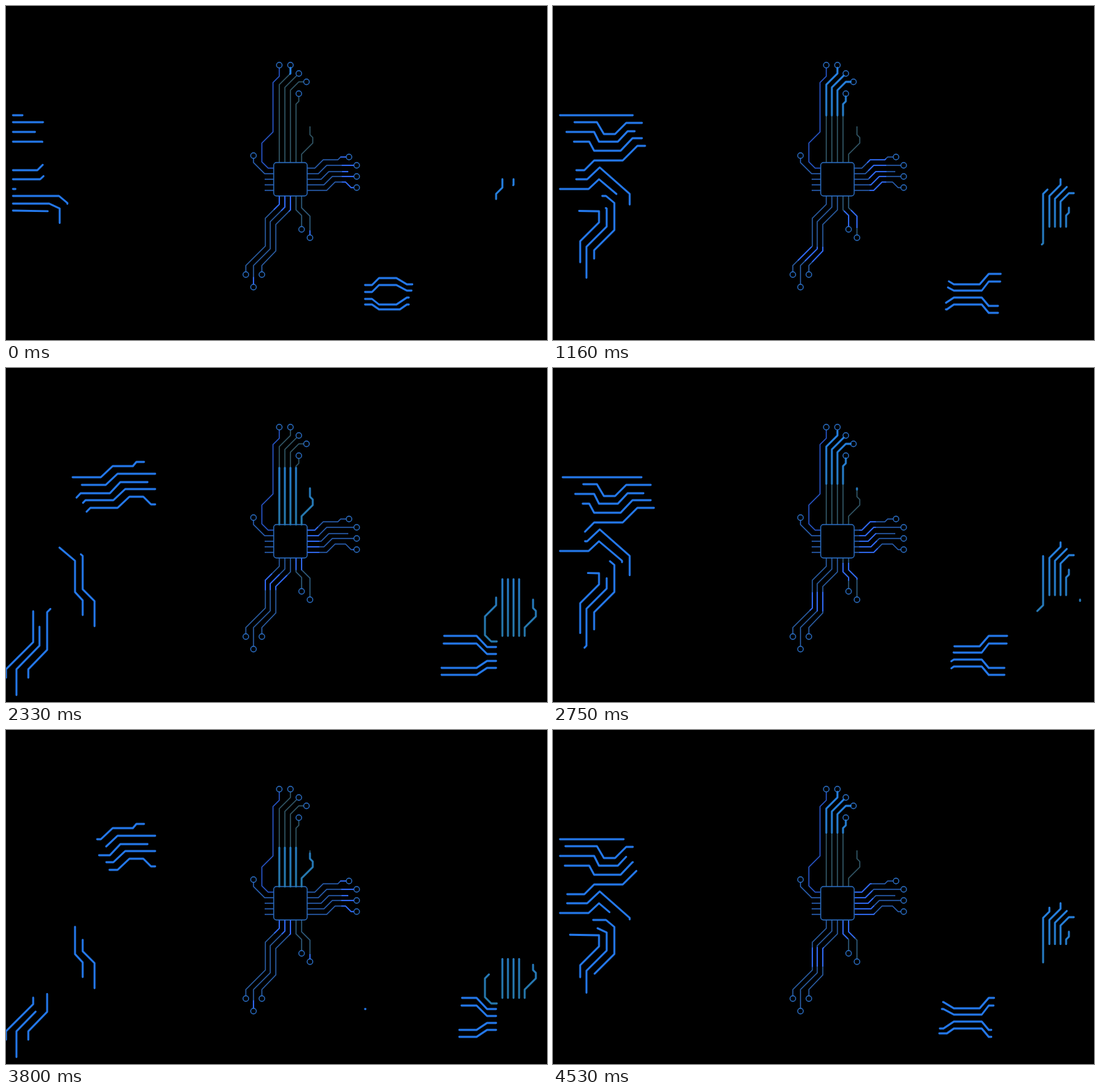
Recreate the animation shown at these times as an HTML page with a canvas. Size 776 by 480 pixels, loop 4.57 s.

```html
<!DOCTYPE html>
<html lang="en">
<head>
<meta charset="utf-8">
<title>Circuit pulses</title>
<style>
  html, body { margin: 0; width: 100%; height: 100%; overflow: hidden; background: #000; }
  canvas { display: block; }
</style>
</head>
<body>
<canvas id="stage" width="776" height="480"></canvas>
<script>
const ctx = document.getElementById('stage').getContext('2d');
const LOOP = 4570;

// Tick groups: [start time, number of ticks]
const TICKS = [[0, 1], [40, 12], [590, 12], [1160, 12], [1720, 12], [2280, 12],
  [2840, 12], [3390, 13], [3920, 13], [4490, 2]];

const paths = list => list.map(d => new Path2D(d));

// Traces run outward from the chip
const columns = paths([
  'M392 225V113L408 97V89',
  'M400 225V117L417 100',
  'M408 225V121L420 109H427',
  'M416 225V141L420 137V130',
  'M424 225V213L440 197V189L436 185V173'
]);
const loopLine = paths(['M384 233H376L367 224V197L383 181V110L392 101V89']);
const leftPins = paths([
  'M384 241H371L355 225V219',
  'M384 249H371M384 257H371M384 265H371'
]);
const rightPins = paths([
  'M432 233H443L455 221H476L480 217H488',
  'M432 241H448L460 229H499',
  'M432 249H452L463 238H491',
  'M432 257H456L468 245H499',
  'M432 265H460L472 253H487L495 261H499'
]);
const longFeet = paths([
  'M392 273V285L372 305V345L344 373V382',
  'M400 273V289L379 310V349L355 373V400',
  'M408 273V293L387 314V352L367 373V382'
]);
const shortFeet = paths([
  'M416 273V293L424 301V317',
  'M424 273V290L436 302V329'
]);
const pads = [[392, 85], [408, 85], [420, 97], [431, 109], [420, 126], [355, 215],
  [492, 217], [503, 229], [503, 245], [503, 261], [344, 386], [355, 404],
  [367, 386], [424, 321], [436, 333]];

const eastBus = paths([
  'M703 401H690L675 385H625L612 400H575L560 391H535L525 401H515',
  'M703 411H690L675 396H625L615 409H575L560 401H535L525 411H515',
  'M703 421H690L675 431H625L615 419H575L560 429H535L525 421H515',
  'M703 431H690L675 441H625L615 429H575L565 436H535L525 429H515'
]);
const westUpper = paths([
  'M198 135H187L182 141H153L136 157H10',
  'M214 152H160L143 168H105L89 184H73L63 167H10',
  'M203 164H164L149 180H107L93 195H66L59 181H10',
  'M214 174H171L154 190H114L97 208H59L52 195H10',
  'M214 196H208L197 185H177L160 201H121L100 222H59L45 236H10'
]);
const westLower = paths([
  'M127 371V335L110 318V270L67 232L49 249H10',
  'M110 355V334L99 322V277L66 249L51 263H10',
  'M32 445V433L59 405V351L88 322V283L76 273H10',
  'M15 470V433L48 399V346L77 317V291L62 284H10',
  'M0 445V433L39 394V338L66 311V295L10 294'
]);

const fade = ctx.createLinearGradient(0, 95, 0, 215);
fade.addColorStop(0, '#2680e2');
fade.addColorStop(1, '#2678ac');

function strokeAll(list, color, width) {
  ctx.strokeStyle = color;
  ctx.lineWidth = width;
  for (const p of list) ctx.stroke(p);
}

// One dash of the given size whose leading end sits at front
function pulse(list, color, width, front, size, period) {
  ctx.setLineDash([size, period - size]);
  ctx.lineDashOffset = size - front;
  strokeAll(list, color, width);
  ctx.setLineDash([]);
}

function tickTime(t) {
  let i = TICKS.length - 1;
  while (TICKS[i][0] > t) i--;
  if (i === 0) return -25;
  const [start, count] = TICKS[i];
  const end = i + 1 < TICKS.length ? TICKS[i + 1][0] : LOOP;
  const step = (end - start) / count;
  return start + Math.floor((t - start) / step) * step;
}

function drawBase() {
  ctx.lineCap = 'butt';
  strokeAll(columns, '#33596a', 1.5);
  strokeAll(loopLine, '#2857cc', 1.5);
  strokeAll(leftPins, '#2a62b8', 1.5);
  strokeAll(rightPins, '#2a60b4', 1.5);
  strokeAll(longFeet, '#2b5fa6', 1.5);
  strokeAll(shortFeet, '#315f80', 1.5);
  ctx.strokeStyle = '#2a6cc0';
  ctx.lineWidth = 1.4;
  for (const [x, y] of pads) {
    ctx.beginPath();
    ctx.arc(x, y, 4, 0, Math.PI * 2);
    ctx.stroke();
  }
  ctx.beginPath();
  ctx.roundRect(384, 225, 48, 48, 4);
  ctx.stroke();
}

function draw(t) {
  ctx.fillStyle = '#000';
  ctx.fillRect(0, 0, 776, 480);
  ctx.lineJoin = 'round';
  drawBase();

  const thin = '#2f66f2';
  pulse(longFeet, thin, 1.7, 25 + 0.073 * t, 28, 140);
  pulse([...rightPins, ...shortFeet], thin, 1.7, 30 + 0.0445 * (t - 690), 29, 85.4);

  const front = 83.5 + 0.142 * (t - 690);
  const wide = (list, color, k = 1) =>
    pulse(list, color, 2.8, front * k, 82.5 * k, 234.5 * k);
  ctx.lineCap = 'round';
  wide(columns, fade);
  wide(eastBus, '#2478ea');
  wide([...westUpper, ...westLower], '#2478ea', 1.37);
  ctx.save();
  ctx.translate(320, 160);
  wide([...columns, ...loopLine], fade);
  ctx.restore();
}

const begin = performance.now();
function frame() {
  draw(tickTime((performance.now() - begin) % LOOP));
  requestAnimationFrame(frame);
}
frame();
</script>
</body>
</html>
```
